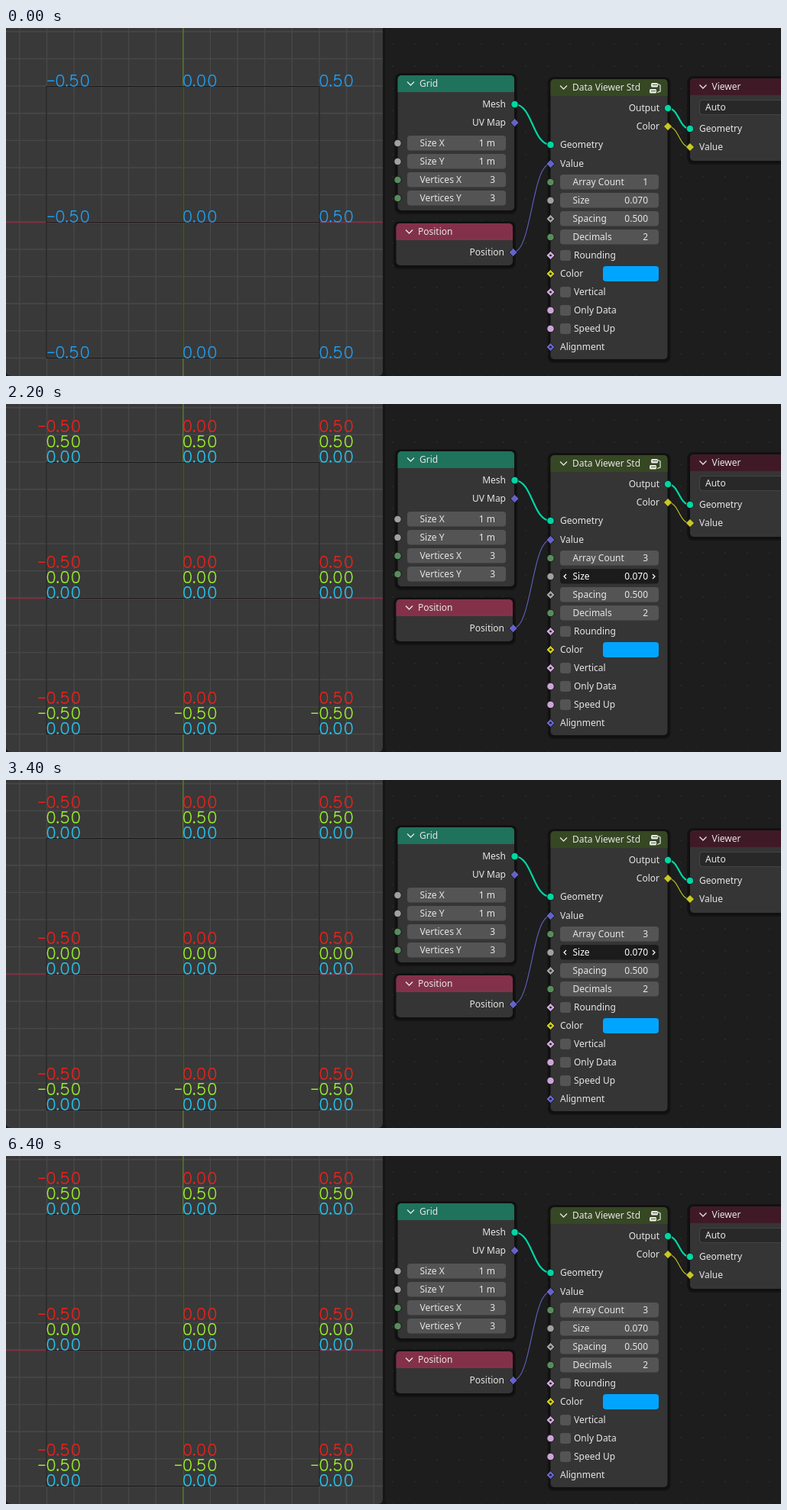
Write an HTML page with a canvas that moves like this. It is 1014 by 456 pixels and loops after 7.1 s.

```html
<!DOCTYPE html>
<html lang="en">
<head>
<meta charset="utf-8">
<title>Data viewer node</title>
<style>
html, body { margin: 0; width: 100%; height: 100%; overflow: hidden; background: #1d1d1d; }
canvas { display: block; }
</style>
</head>
<body>
<canvas id="stage" width="1014" height="456"></canvas>
<script>
const ctx = document.getElementById('stage').getContext('2d');
const LOOP = 7100;
const TEAL = '#00d6a3', PURPLE = '#6363c7', GRAY = '#a1a1a1', GREEN = '#598c5c',
      YELLOW = '#c7c729', PINK = '#cca6d6';

// Single-stroke glyphs, 21 units tall, y pointing up
const ZERO = new Path2D('M7.7 21 4.8 20 3 17 2 12 2 9 3 4 4.8 1 7.7 0 9.8 0 12.7 1 14.5 4 15.5 9 15.5 12 14.5 17 12.7 20 9.8 21Z');
const FIVE = new Path2D('M13.6 21H4L3 12 4 13 6.7 14 9.6 14 12.5 13 14.5 11 15.5 8 15.5 6 14.5 3 12.5 1 9.6 0 6.7 0 4 1 3 2 2 4');
const DOT = new Path2D('M.5 2 -.4 1 .5 0 1.4 1Z');
const MINUS = new Path2D('M2 10H15');
const GLYPHS = { '0': [ZERO, 21], '5': [FIVE, 21], '.': [DOT, 5.5], '-': [MINUS, 17.5] };

// Latest entry [time, value] that has started
const stepAt = (keys, t) => keys.reduce((v, k) => t >= k[0] ? k[1] : v, keys[0][1]);

const COUNT = [[0, 1], [900, 2], [1300, 3]];
const SIZE = [[0, .07], [2800, .1], [2900, .11], [3100, .12], [3200, .11], [3300, .09], [3400, .07]];
const DECIMALS = [[0, 2], [5000, 3], [5800, 2]];
const ACTIVE = [[0, ''], [800, 'Array Count'], [1500, ''], [2200, 'Size'], [3700, ''], [4800, 'Decimals'], [5900, '']];
const MOVES = [
  [[100, 987, 125], [200, 962, 100], [300, 915, 125], [400, 880, 165], [500, 855, 195], [600, 847, 207], [800]],
  [[1500, 870, 207], [1600, 873, 214], [1800, 862, 222], [2100, 848, 224], [2200]],
  [[3700, 847, 217], [3900, 847, 224], [4200, 847, 250], [4400, 847, 264], [4600, 847, 269], [4800]],
  [[5900, 847, 269], [6000, 856, 269], [6300, 935, 259], [6400]]
];

function cursorAt(t) {
  const path = MOVES.find(m => t >= m[0][0] && t < m[m.length - 1][0]);
  if (!path) return null;
  const i = path.findIndex(p => p[0] > t);
  const a = path[i - 1], b = path[i].length > 1 ? path[i] : a;
  const k = b === a ? 0 : (t - a[0]) / (b[0] - a[0]);
  return { x: a[1] + (b[1] - a[1]) * k, y: a[2] + (b[2] - a[2]) * k };
}

function box(x, y, w, h, r, fill) {
  ctx.fillStyle = fill;
  ctx.beginPath();
  ctx.roundRect(x, y, w, h, r);
  ctx.fill();
}

function line(points, color, width = 1) {
  ctx.strokeStyle = color;
  ctx.lineWidth = width;
  ctx.beginPath();
  points.forEach(([x, y]) => ctx.lineTo(x, y));
  ctx.stroke();
}

function label(text, x, y, align = 'left', color = '#e6e6e6') {
  ctx.font = '12px "Noto Sans", sans-serif';
  ctx.textAlign = align;
  ctx.fillStyle = color;
  ctx.fillText(text, x, y + 4);
}

function strokeText(text, x, y, u, color) {
  ctx.save();
  ctx.translate(x, y);
  ctx.scale(u, -u);
  ctx.strokeStyle = color;
  ctx.lineWidth = 1.5 / u;
  for (const ch of text) {
    const [path, advance] = GLYPHS[ch];
    ctx.stroke(path);
    ctx.translate(advance, 0);
  }
  ctx.restore();
}

function viewport(t) {
  ctx.save();
  ctx.beginPath();
  ctx.roundRect(0, -8, 493, 464, 6);
  ctx.clip();
  ctx.fillStyle = '#393939';
  ctx.fillRect(0, 0, 493, 456);
  for (let i = -7; i <= 7; i++) {
    const x = 231.7 + i * 35.65, y = 254.3 + i * 35.65;
    line([[x, 0], [x, 456]], '#484848', 1.4);
    line([[0, y], [493, y]], '#484848', 1.4);
  }
  line([[0, 254.5], [493, 254.5]], '#863044', 1.3);
  line([[231.7, 0], [231.7, 456]], '#577a2c', 1.4);
  for (const i of [-1, 0, 1]) {
    const x = 231.5 + i * 178.5, y = 254.5 + i * 178;
    line([[x, 76], [x, 433]], i ? '#191919' : 'rgba(25,30,18,.6)');
    line([[53, y], [410, y]], '#191919');
  }
  drawValues(t);
  ctx.restore();
}

function drawValues(t) {
  const count = stepAt(COUNT, t), decimals = stepAt(DECIMALS, t);
  const u = stepAt(SIZE, t) * 9.715;
  const colors = count === 1 ? ['#1f9cf0'] : ['#ea211b', '#9af02a', '#20c8f5'];
  for (const row of [-1, 0, 1]) for (const col of [-1, 0, 1]) {
    [col / 2, -row / 2, 0].slice(0, count).forEach((v, i) => {
      const negative = v < 0;
      const text = (negative ? '-' : '') + Math.abs(v).toFixed(decimals);
      const shift = negative && count > 1 ? 17.5 * u : 0;
      const lift = (count - 1 - i) * 29.4 * u;
      strokeText(text, 231.5 + col * 178.5 - shift, 254 + row * 178 - lift, u, colors[i]);
    });
  }
}

function node(x, y, w, h, title, color) {
  box(x - 4, y - 3, w + 8, h + 8, 8, 'rgba(10,10,10,.45)');
  box(x - 2.5, y - 2, w + 5, h + 5, 6, '#101010');
  box(x, y, w, h, 5, '#353535');
  box(x, y, w, 22, [5, 5, 0, 0], color);
  line([[x + 12.5, y + 8.5], [x + 17, y + 13], [x + 21.5, y + 8.5]], '#e6e6e6', 1.3);
  label(title, x + 28.5, y + 11);
}

function socket(x, y, color, shape = 'circle') {
  ctx.beginPath();
  if (shape === 'circle') ctx.arc(x, y, 4.7, 0, 7);
  else [[0, -5.6], [5.6, 0], [0, 5.6], [-5.6, 0]].forEach(([dx, dy]) => ctx.lineTo(x + dx, y + dy));
  ctx.closePath();
  ctx.fillStyle = color;
  ctx.fill();
  ctx.strokeStyle = '#111';
  ctx.lineWidth = .8;
  ctx.stroke();
  if (shape === 'dotted') {
    ctx.beginPath();
    ctx.arc(x, y, 1.3, 0, 7);
    ctx.fillStyle = '#111';
    ctx.fill();
  }
}

function link(x0, y0, x1, y1, color, width) {
  const mid = (x0 + x1) / 2;
  ctx.strokeStyle = color;
  ctx.lineWidth = width;
  ctx.beginPath();
  ctx.moveTo(x0, y0);
  ctx.bezierCurveTo(mid, y0, mid, y1, x1, y1);
  ctx.stroke();
}

function field(x, y, name, value, state = '') {
  const fills = { active: '#1b1b1b', hover: '#656565' };
  box(x, y - 10, 129, 19.5, 4, fills[state] || '#545454');
  const color = state ? '#fff' : '#e6e6e6';
  if (state) {
    line([[x + 8, y - 3], [x + 5, y], [x + 8, y + 3]], color, 1.2);
    line([[x + 121, y - 3], [x + 124, y], [x + 121, y + 3]], color, 1.2);
  }
  label(name, x + 16.5, y, 'left', color);
  label(value, x + 115, y, 'right', color);
}

function groupIcon(x, y) {
  box(x + 2, y, 9, 5.5, 1.5, '#e6e6e6');
  box(x, y + 8, 9, 5.5, 1.5, '#e6e6e6');
  line([[x + 4, y + 2.5], [x + 10, y + 2.5]], '#364723', .8);
  line([[x + 2, y + 10.5], [x + 8, y + 10.5]], '#364723', .8);
  line([[x + 11, y + 1.5], [x + 14, y + 3], [x + 14, y + 11], [x + 10, y + 12.5]], '#e6e6e6', 1.2);
}

function dataViewer(t, cursor) {
  node(712.5, 67, 153, 367, 'Data Viewer Std', '#364723');
  groupIcon(842, 72);
  label('Output', 855, 105, 'right');
  label('Color', 855, 129, 'right');
  label('Geometry', 725, 153);
  label('Value', 725, 178);

  const active = stepAt(ACTIVE, t);
  const fields = [
    ['Array Count', stepAt(COUNT, t)],
    ['Size', stepAt(SIZE, t).toFixed(3)],
    ['Spacing', '0.500'],
    ['Decimals', stepAt(DECIMALS, t)]
  ];
  fields.forEach(([name, value], i) => {
    const y = 202 + i * 24;
    const hovered = cursor && cursor.x < 854 && Math.abs(cursor.y - y) < 12;
    field(725, y, name, value, active === name ? 'active' : hovered ? 'hover' : '');
  });

  const checks = [['Rounding', 298], ['Vertical', 346], ['Only Data', 370], ['Speed Up', 394]];
  for (const [name, y] of checks) {
    box(725, y - 7, 14, 14, 3, '#545454');
    label(name, 743, y);
  }
  label('Color', 725, 322);
  box(781, 312, 73, 20, 4, '#00a5ff');
  label('Alignment', 725, 418);
}

function nodeEditor(t, cursor) {
  ctx.fillStyle = '#161616';
  ctx.fillRect(0, 0, 1014, 456);
  box(496, -8, 526, 464, 6, '#1d1d1d');
  ctx.fillStyle = '#272727';
  for (let x = 505; x < 1014; x += 29) for (let y = 20; y < 456; y += 29) ctx.fillRect(x, y, 2, 2);

  node(512.5, 62, 152.5, 177, 'Grid', '#1f725c');
  label('Mesh', 654, 100, 'right');
  label('UV Map', 654, 124, 'right');
  [['Size X', '1 m'], ['Size Y', '1 m'], ['Vertices X', 3], ['Vertices Y', 3]]
    .forEach(([name, value], i) => field(525, 151 + i * 24, name, value));

  node(510.5, 256, 152.5, 55, 'Position', '#83314a');
  label('Position', 652, 294, 'right');

  node(895, 66, 153, 108, 'Viewer', '#3f1a26');
  box(907, 94, 129, 20, 4, '#444');
  box(908, 95, 127, 18, 3.5, '#282828');
  label('Auto', 915, 104);
  label('Geometry', 907, 132);
  label('Value', 907, 156);

  dataViewer(t, cursor);

  link(665.5, 100, 712.5, 153, TEAL, 2.2);
  link(663.5, 294, 712.5, 178, PURPLE, 1.1);
  link(866, 105, 895, 132, TEAL, 2.2);
  link(866, 129, 895, 156, YELLOW, 1.1);
  drawSockets();
}

function drawSockets() {
  socket(665.5, 100, TEAL);
  socket(665.5, 124, PURPLE, 'diamond');
  [GRAY, GRAY, GREEN, GREEN].forEach((c, i) => socket(512.5, 151 + i * 24, c));
  socket(663.5, 294, PURPLE, 'diamond');
  socket(866, 105, TEAL);
  socket(866, 129, YELLOW, 'diamond');
  socket(895, 132, TEAL);
  socket(895, 156, YELLOW, 'diamond');
  const inputs = [
    [TEAL], [PURPLE, 'diamond'], [GREEN], [GRAY], [GRAY, 'dotted'], [GREEN],
    [PINK, 'dotted'], [YELLOW, 'dotted'], [PINK, 'dotted'], [PINK], [PINK], [PURPLE, 'dotted']
  ];
  inputs.forEach(([color, shape], i) => socket(712.5, (i ? 154 : 153) + i * 24, color, shape));
}

function drawCursor({ x, y }) {
  const arrow = new Path2D('M.5 .5V15.5L4 12.3 6.6 18 9 17 6.5 11.3H11.3Z');
  ctx.save();
  ctx.translate(x, y);
  ctx.fillStyle = '#fff';
  ctx.fill(arrow);
  ctx.strokeStyle = '#111';
  ctx.lineWidth = 1;
  ctx.stroke(arrow);
  ctx.restore();
}

function frame(now) {
  const t = Math.floor(now % LOOP / 100) * 100;
  const cursor = cursorAt(t);
  nodeEditor(t, cursor);
  viewport(t);
  if (cursor) drawCursor(cursor);
  requestAnimationFrame(frame);
}
frame(0);
</script>
</body>
</html>
```
